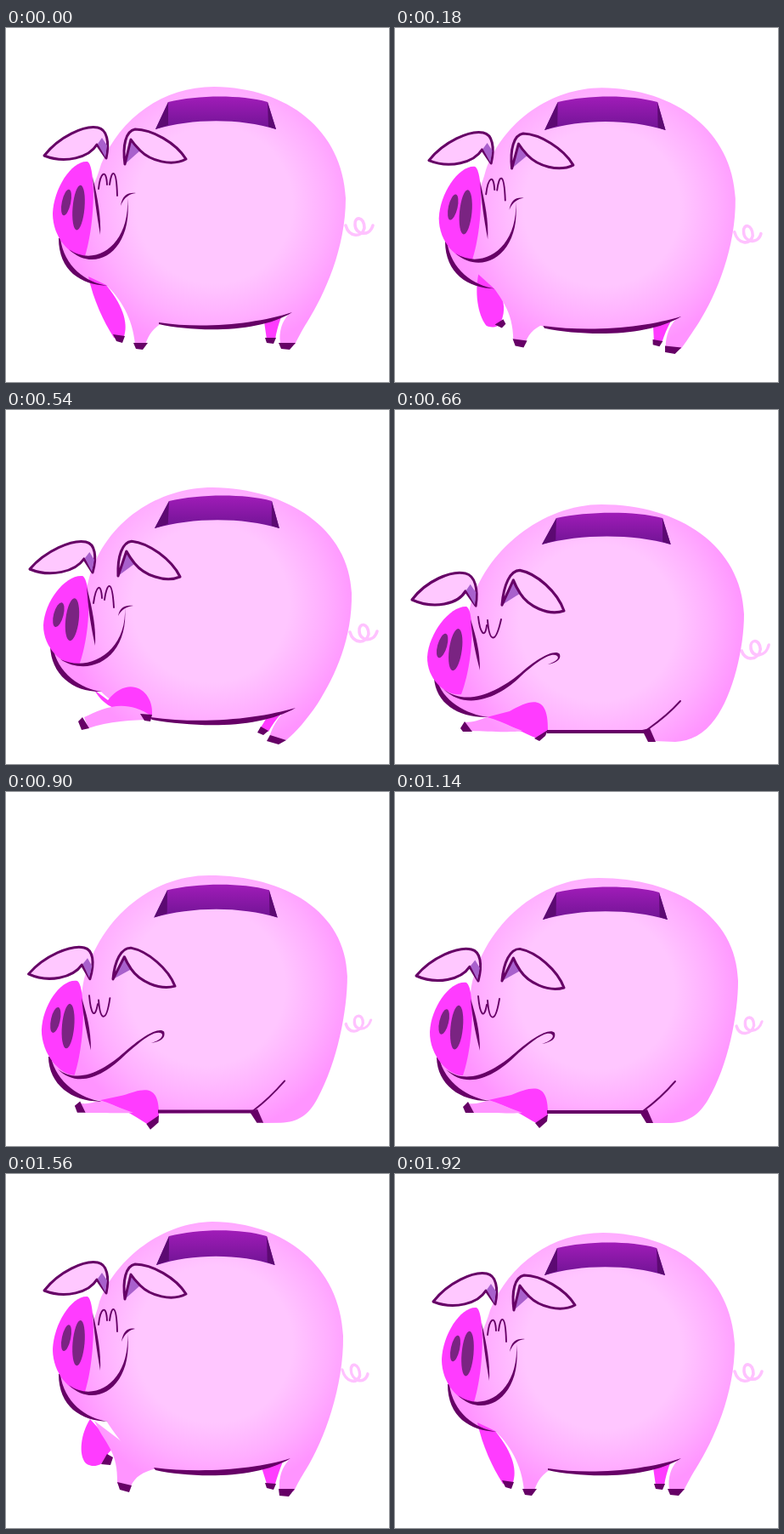
An HTML page that plays this animation: 451x416 px, repeating every 1980 ms.

```html
<!DOCTYPE html>
<html lang="en">
<head>
<meta charset="utf-8">
<title>Piggy bank</title>
<style>
  html, body { margin: 0; width: 100%; height: 100%; overflow: hidden; background: #fff; }
  svg { display: block; width: 451px; height: 416px; }
  .dark { fill: #660066; }
  .pink { fill: url(#skin); }
  .hot { fill: #ff3cff; }
  .line { fill: none; stroke: #660066; stroke-width: 1.9; stroke-linecap: round; }
  .leaf { fill: #ffc8ff; stroke: #660066; stroke-width: 3; stroke-linejoin: round; }
  .fold { fill: #a860cc; }
  .nostril { fill: #7a2482; }
</style>
</head>
<body>
<svg viewBox="0 0 451 416">
  <defs>
    <radialGradient id="skin" gradientUnits="userSpaceOnUse" cx="245" cy="208" r="174">
      <stop offset=".53" stop-color="#ffc6ff"/>
      <stop offset=".78" stop-color="#ffaeff"/>
      <stop offset="1" stop-color="#ff94ff"/>
    </radialGradient>
    <linearGradient id="hole" x1="0" y1="0" x2="0" y2="1">
      <stop offset="0" stop-color="#a01cb8"/>
      <stop offset="1" stop-color="#701494"/>
    </linearGradient>
  </defs>
  <g id="tail"><path d="M400,232 C404,246 419,247 422,235 C422,221 410,221 411,231 C411,243 428,246 432,232"
    fill="none" stroke="#ffc2ff" stroke-width="3.600" stroke-linecap="round"/></g>
  <path id="hindFar" class="hot"/>
  <path id="body" class="pink"/>
  <path id="foreFar" class="hot"/>
  <path id="foreNear" class="pink"/>
  <path id="belly" class="dark"/>
  <path id="hindFeet" class="dark"/>
  <path id="foreFeet" class="dark"/>
  <path id="thigh" class="line"/>
  <g id="slot">
    <path fill="url(#hole)" d="M191,87 C225,79 275,78 308,87 L318,119 C275,106 220,106 176,119 Z"/>
    <path fill="#5c0a72" d="M191,87 L191,114 L176,119 Z M308,87 L309,116 L318,119 Z"/>
  </g>
  <path id="chin" class="dark"/>
  <g id="snout">
    <path class="hot" d="M96,157 C105,162 106,225 93,268 C78,270 55,248 55,218 C56,188 78,155 96,157 Z"/>
    <ellipse class="nostril" cx="71" cy="205" rx="5.2" ry="15.5" transform="rotate(12 71 205)"/>
    <ellipse class="nostril" cx="85.5" cy="211" rx="7" ry="26.5" transform="rotate(5 85 211)"/>
  </g>
  <path id="mouth" class="dark"/>
  <path id="ridge" class="dark"/>
  <path id="eyes" class="line"/>
  <g id="earFar">
    <path class="leaf" d="M118,153 C122,134 119,119 108,117 C92,114 62,128 45,150 C70,160 98,152 107,137 Z"/>
    <path class="fold" d="M108,136 L113,129 L119,138 L117,152 Z"/>
  </g>
  <g id="earNear">
    <path class="fold" d="M147,131 L140,160 L158,144 Z"/>
    <path class="leaf" d="M140,160 C137,138 141,121 152,119 C172,119 200,135 212,154 C195,163 170,156 158,144 C152,138 149,134 147,131 Z"/>
  </g>
</svg>
<script>
// Poses in order: stand, stretch, step, squash, settle
const STAND = 0, STRETCH = 1, STEP = 2, SQUASH = 3, SETTLE = 4;

// Outlines that morph from pose to pose
const shapes = {
  body: [
    'M112,160 C135,105 185,69 245,69 C332,70 396,120 400,200 C400,259 375,313 355,345 C348,356 343,366 340,372 L323,371 C321,356 325,345 333,336 C300,350 235,358 181,347 C160,335 135,315 118,302 C90,302 64,285 63,247 C80,230 100,200 112,160 Z',
    'M110,150 C130,98 185,57 243,56 C328,57 393,108 397,190 C398,250 374,314 354,346 C347,357 342,366 339,373 L322,371 C321,356 325,345 333,336 C300,350 235,356 175,346 C155,340 138,320 118,290 C90,290 64,274 63,236 C80,220 100,190 110,150 Z',
    'M98,197 C118,130 180,91 243,91 C332,92 404,140 407,215 C408,268 388,312 367,345 C354,364 342,378 330,388 L310,384 C314,372 319,364 325,357 C295,370 235,374 170,362 C150,355 125,345 112,331 C80,330 54,310 53,277 C70,260 90,230 98,197 Z',
    'M88,233 C105,165 174,111 243,111 C335,111 408,160 411,240 C411,280 398,335 377,363 C364,381 348,389 330,390 L305,389 C300,383 298,380 295,378 C250,378 200,379 165,379 C140,379 120,372 108,361 C70,358 48,340 47,315 C65,290 85,260 88,233 Z',
    'M90,228 C106,155 170,101 240,101 C330,101 402,145 404,222 C404,262 392,322 369,361 C358,380 345,388 325,389 L303,389 C298,384 296,380 292,376 C250,377 200,378 165,378 C140,378 122,372 110,362 C75,360 51,342 50,312 C68,290 87,258 90,228 Z'
  ],
  hindFar: [
    'M304,345 L307,366 L317,366 C318,358 321,348 324,340 Z',
    'M301,345 L307,364 L317,364 C319,357 322,348 326,338 Z',
    'M308,360 L300,373 L309,378 C313,371 318,363 325,356 Z',
    '', ''
  ],
  foreFar: [
    'M97,292 C103,320 115,345 127,364 C131,365 136,364 139,362 C143,350 141,330 118,302 Z',
    'M99,288 C88,305 85,330 94,340 C102,346 113,342 114,338 C118,330 124,324 128,320 Z',
    'M104,329 C112,342 120,352 162,362 C166,362 170,361 172,358 C174,330 145,310 120,341 Z',
    'M108,361 C130,366 150,380 168,386 C172,384 177,380 180,377 C181,333 160,340 135,354 Z',
    'M110,362 C132,368 150,380 168,390 C172,387 177,383 180,380 C181,340 162,346 137,356 Z'
  ],
  foreNear: [
    'M116,300 C135,318 149,340 152,372 L164,372 C168,360 174,352 185,346 Z',
    'M104,290 C118,320 132,325 131,364 L147,367 C152,356 160,350 178,346 Z',
    'M172,360 C140,338 115,350 92,361 L97,374 C120,366 150,364 172,364 Z',
    'M108,361 C100,364 92,367 82,367 L90,377 C110,378 140,379 150,377 Z',
    'M110,362 C102,365 95,367 86,366 L92,377 C115,377 140,378 150,377 Z'
  ],
  hindFeet: [
    'M305,364 L318,364 L315,371 L307,370 Z M321,370 L341,370 L334,378 L324,377 Z',
    'M305,363 L318,364 L315,371 L307,369 Z M321,370 L340,370 L333,379 L322,378 Z',
    'M300,372 L309,377 L303,382 L296,379 Z M311,382 L330,388 L321,393 L307,389 Z',
    'M291,376 L300,374 L307,390 L298,390 Z',
    'M288,376 L297,373 L304,389 L296,389 Z'
  ],
  foreFeet: [
    'M126,360 L140,362 L137,370 L130,368 Z M150,370 L167,370 L161,378 L153,377 Z',
    'M112,341 L119,329 L126,333 L123,342 Z M131,362 L148,366 L145,374 L134,371 Z',
    'M158,357 L172,358 L170,366 L163,365 Z M90,361 L98,374 L89,376 L85,366 Z',
    'M164,386 L180,376 L177,383 L170,389 Z M77,374 L82,366 L91,378 L80,378 Z',
    'M165,389 L180,379 L179,387 L170,395 Z M80,370 L86,364 L93,377 L83,377 Z'
  ],
  belly: [
    'M180,346 C230,354 295,348 337,334 C300,358 225,358 180,348 Z',
    'M174,345 C230,352 295,347 335,334 C298,358 222,358 176,348 Z',
    'M170,361 C235,370 300,362 341,350 C300,374 230,374 172,364 Z',
    'M179,376 L295,376 L295,380 L179,380 Z',
    'M179,374 L292,374 L292,378 L179,378 Z'
  ],
  thigh: ['', '', '',
    'M336,342 C320,360 305,370 295,377',
    'M330,340 C316,356 303,367 292,375'
  ],
  chin: [
    'M62,247 C62,285 88,302 120,303 C94,299 68,280 64,247 Z',
    'M62,235 C62,273 88,290 120,291 C94,287 68,268 64,235 Z',
    'M52,277 C53,312 80,332 113,331 C89,328 60,310 55,277 Z',
    'M46,315 C48,345 75,362 110,361 C85,358 55,342 49,315 Z',
    'M49,312 C50,345 78,364 112,363 C88,360 58,342 52,312 Z'
  ],
  mouth: [
    'M74,260 C105,290 150,262 143,200 C146,255 105,282 74,260 Z M135,209 C137,196 144,193 153,194 C145,195 139,199 135,209 Z',
    'M74,248 C105,278 150,250 143,188 C146,243 105,270 74,248 Z M136,197 C138,184 144,180 152,182 C146,183 140,187 136,197 Z',
    'M64,293 C98,315 145,292 140,231 C143,284 98,309 64,293 Z M132,242 C134,232 140,229 150,230 C142,231 136,234 132,242 Z',
    'M57,328 C85,350 122,330 147,310 C166,293 188,280 194,287 C196,293 190,297 180,299 C189,296 194,292 191,289 C184,284 168,295 149,312 C124,337 85,355 57,328 Z',
    'M60,326 C85,346 118,327 141,307 C160,290 182,276 188,283 C190,290 184,294 173,296 C183,293 188,288 185,285 C178,280 162,292 143,309 C118,334 85,351 60,326 Z'
  ],
  ridge: [
    'M102,175 C108,200 112,222 111,243 C107,220 104,200 102,175 Z',
    'M102,163 C108,188 112,210 111,231 C107,208 104,188 102,163 Z',
    'M95,208 C102,235 106,255 105,277 C100,255 97,235 95,208 Z',
    'M89,246 C96,268 100,285 100,306 C95,287 91,268 89,246 Z',
    'M89,243 C95,262 100,280 100,304 C95,285 91,265 89,243 Z'
  ],
  eyes: [
    'M109,189 C111,170 118,164 119,184 M122,184 C124,167 130,162 131,197',
    'M109,177 C111,158 118,152 119,172 M122,172 C124,155 130,150 131,185',
    'M103,227 C106,206 112,202 113,221 M116,223 C119,202 125,198 127,232',
    'M98,243 C100,262 106,270 108,253 M109,247 C111,272 118,277 125,246',
    'M98,240 C100,262 105,268 108,250 M109,245 C111,270 118,273 123,243'
  ]
};

// Rigid parts: three anchor points per pose
const pins = {
  tail: ['400,231 432,231 400,244', '396,229 426,234 396,242', '405,260 437,259 405,273', '408,282 440,275 409,295', '402,274 432,269 402,286'],
  slot: ['191,87 308,87 176,119', '192,73 307,73 177,107', '192,107 313,107 175,139', '190,127 315,127 173,158', '190,118 311,118 174,150'],
  snout: ['96,157 93,268 55,218', '96,144 93,256 55,206', '90,195 86,300 44,253', '84,231 78,334 38,290', '84,224 80,333 41,282'],
  earFar: ['45,150 108,117 117,153', '45,137 108,104 117,140', '28,187 94,155 101,191', '20,223 83,192 94,230', '25,216 90,185 97,222'],
  earNear: ['212,154 150,119 140,160', '212,141 150,106 140,147', '205,196 146,154 132,195', '199,236 145,188 126,229', '199,230 145,184 126,222']
};
const glow = ['245,208', '245,200', '241,228', '239,250', '237,234'];

// [from, to, amount, dip]; played forwards, then backwards
const steps = [
  [STAND, STRETCH, 0, 0], [STAND, STRETCH, .1, .25], [STAND, STRETCH, .3, .4],
  [STAND, STRETCH, .6, .3], [STAND, STRETCH, .85, .12], [STAND, STRETCH, 1, 0],
  [STAND, STRETCH, 1, 0], [STRETCH, STEP, .33, 0], [STRETCH, STEP, .67, 0], [STRETCH, STEP, 1, 0],
  [SQUASH, SETTLE, -.5, 0], [SQUASH, SETTLE, 0, 0], [SQUASH, SETTLE, .5, 0], [SQUASH, SETTLE, 1, 0],
  [SQUASH, SETTLE, 1.2, 0], [SQUASH, SETTLE, 1.3, 0], [SQUASH, SETTLE, 1.35, 0]
];
const STEP_MS = 60, COUNT = 33, LAST = steps.length - 1;

const el = id => document.getElementById(id);
const nums = s => s.match(/-?[\d.]+/g).map(Number);

function mix(a, b, t) {
  if (!t || !a) return a;
  const to = nums(b);
  let i = 0;
  return a.replace(/-?[\d.]+/g, n => (+n + (to[i++] - n) * t).toFixed(2));
}

function blend(keys, [from, to, t, dip], planted) {
  const s = mix(keys[from], keys[to], t);
  return planted ? s : mix(s, keys[STEP], dip);
}

// Affine matrix taking the three points of src to those of dst
function affine(src, dst) {
  const [x0, y0, x1, y1, x2, y2] = nums(src), d = nums(dst);
  const ux = x1 - x0, uy = y1 - y0, vx = x2 - x0, vy = y2 - y0, det = ux * vy - uy * vx;
  const row = k => {
    const p = d[2 + k] - d[k], q = d[4 + k] - d[k];
    const a = (p * vy - q * uy) / det, c = (q * ux - p * vx) / det;
    return [a, c, d[k] - a * x0 - c * y0];
  };
  const [a, c, e] = row(0), [b, f, g] = row(1);
  return `matrix(${[a, b, c, f, e, g].map(n => n.toFixed(5))})`;
}

function draw(step) {
  for (const id in shapes) el(id).setAttribute('d', blend(shapes[id], step, id.startsWith('fore')));
  for (const id in pins) el(id).setAttribute('transform', affine(pins[id][0], blend(pins[id], step)));
  const [cx, cy] = nums(blend(glow, step));
  el('skin').setAttribute('cx', cx);
  el('skin').setAttribute('cy', cy);
}

const start = performance.now();
let shown = -1;
function tick() {
  const i = Math.floor(Math.max(0, performance.now() - start) / STEP_MS) % COUNT;
  if (i !== shown) draw(steps[LAST - Math.abs(LAST - i)]);
  shown = i;
  requestAnimationFrame(tick);
}
tick();
</script>
</body>
</html>
```
